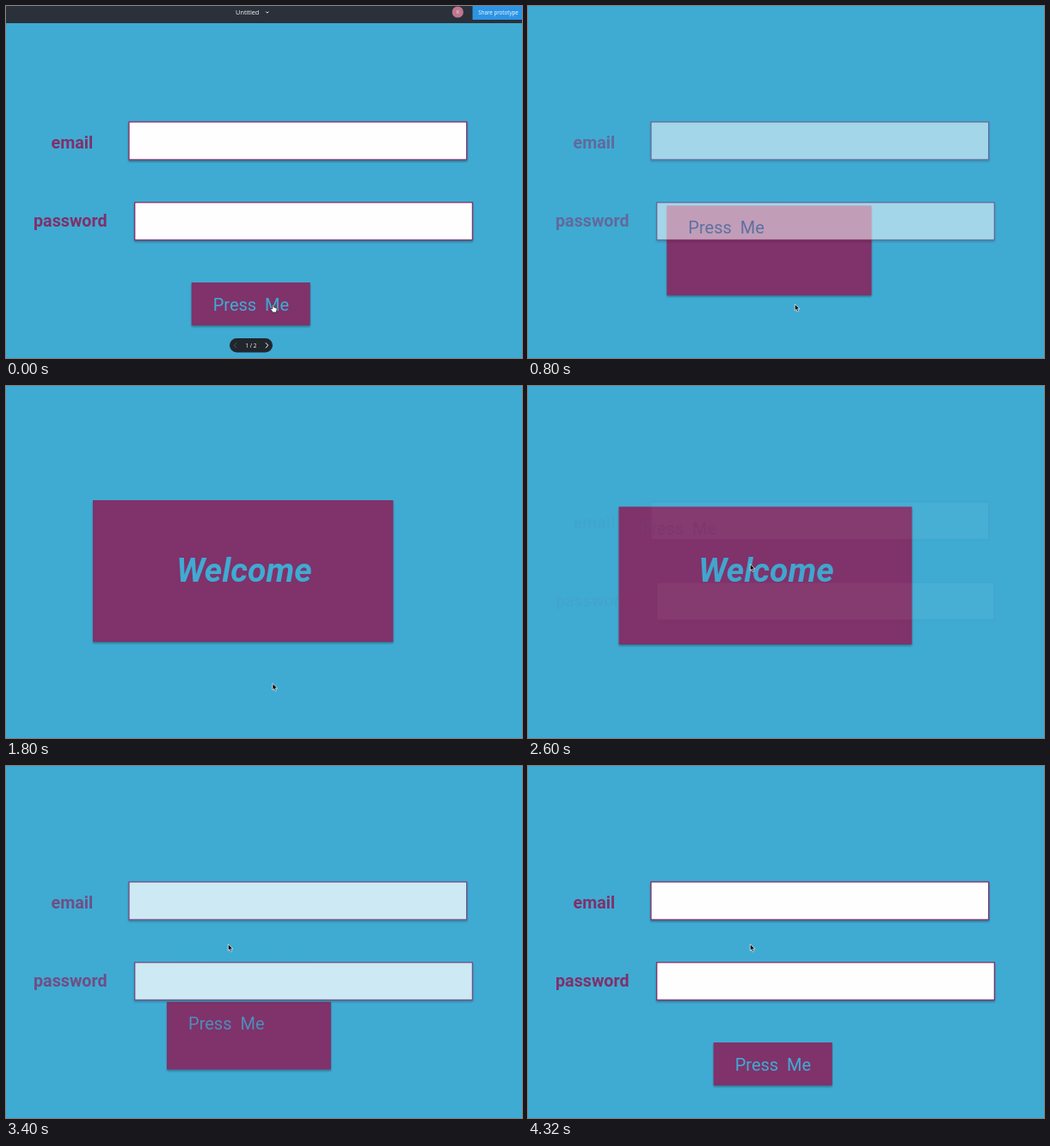
These frames come from a looping animation (600x410 px, 4360 ms). An HTML page:

```html
<!DOCTYPE html>
<html lang="en">
<head>
<meta charset="utf-8">
<title>Login prototype</title>
<style>
  html, body { margin: 0; width: 100%; height: 100%; overflow: hidden; background: #3fabd3; }
  svg { display: block; width: 600px; height: 410px; font-family: Roboto, sans-serif; }
  text { white-space: pre; }
  .plum { fill: #80306a; }
  .sky { fill: #3fabd3; }
  .label { font-size: 19.7px; font-weight: 700; }
  .ui { font-family: "Open Sans", sans-serif; fill: #fff; text-anchor: middle; }
  .line { fill: none; stroke: #fff; stroke-width: 1; }
  .field { fill: #fefefe; stroke: #80306a; stroke-width: 1.3; }
</style>
</head>
<body>
<svg viewBox="0 0 600 410">
  <defs>
    <filter id="shadow" x="-5%" y="-20%" width="110%" height="150%">
      <feDropShadow dx="0" dy="1.7" stdDeviation="1" flood-color="#000" flood-opacity=".32"/>
    </filter>
  </defs>
  <rect class="sky" width="600" height="410"/>

  <rect id="box" class="plum" filter="url(#shadow)"/>
  <g id="form">
    <text class="plum label" x="52.5" y="166">email</text>
    <text class="plum label" x="32" y="257">password</text>
    <g filter="url(#shadow)">
      <rect class="field" x="143" y="135" width="392.7" height="44"/>
      <rect class="field" x="149.7" y="228.8" width="392.7" height="43.7"/>
    </g>
    <text id="press" class="sky" font-size="20">Press  Me</text>
  </g>
  <text id="welcome" class="sky" x="277" y="227.7" font-size="39" font-weight="700"
    font-style="italic" text-anchor="middle">Welcome</text>

  <g id="chrome">
    <rect width="600" height="20" fill="#2a313a"/>
    <text class="ui" x="280.7" y="10.2" font-size="7.3">Untitled</text>
    <path class="line" stroke-width=".8" d="M302.3 6.6l1.5 1.5 1.5-1.5"/>
    <circle cx="525.3" cy="7" r="6.6" fill="#c0768f"/>
    <text class="ui" x="525.3" y="9" font-size="5.4" opacity=".8">R</text>
    <rect x="542.5" width="57.5" height="16" fill="#2c94e4"/>
    <text class="ui" x="572.6" y="9.6" font-size="6.2">Share prototype</text>
    <rect x="260" y="387" width="50" height="16.5" rx="8.2" fill="#21262d"/>
    <text class="ui" x="285" y="397.6" font-size="6.4">1 / 2</text>
    <path class="line" d="M302 392.3l2.7 3-2.7 3"/>
    <path class="line" opacity=".2" d="M268 392.3l-2.7 3 2.7 3"/>
  </g>

  <g id="cursor" stroke-linejoin="round">
    <path id="arrow" d="M0 0V7.6L1.8 6 3 8.8 4.4 8.2 3.2 5.4H5.6Z" fill="#000" stroke="#fff" stroke-width=".7"/>
    <path id="hand" d="M-.7 .7Q0-.5 .8 .7V3.4L4 4.2Q5 4.6 4.8 6L4 9.6H0L-2.6 6Q-2.6 4.6-.7 5.6Z"
      fill="#fff" stroke="#111" stroke-width=".7"/>
  </g>
</svg>
<script>
const LOOP = 4360, STEP = 40;
const OPEN = [185, 1448], CLOSE = [2329, 4014], MOVE = [1770, 2250], CHROME = [20, 540];
const SMALL = { x: 215.7, y: 322, width: 138, height: 50 };
const LARGE = { x: 101, y: 133, width: 349.3, height: 165 };

const $ = id => document.getElementById(id);
const part = Object.fromEntries(
  ["box", "form", "press", "welcome", "chrome", "cursor", "arrow", "hand"].map(id => [id, $(id)]));
const set = (name, attrs) => {
  for (const key in attrs) part[name].setAttribute(key, attrs[key]);
};
const mix = (a, b, p) => a + (b - a) * p;
const span = (t, [from, to]) => Math.min(1, Math.max(0, (t - from) / (to - from)));

// cubic-bezier(.5, 0, .5, 1), solved by bisection
function ease(x) {
  if (x <= 0 || x >= 1) return x;
  let lo = 0, hi = 1;
  for (let i = 0; i < 24; i++) {
    const s = (lo + hi) / 2;
    if (1.5 * s * (1 - s) + s ** 3 < x) lo = s; else hi = s;
  }
  return lo * lo * (3 - 2 * lo);
}

function render(t) {
  const p = ease(span(t, OPEN)) - ease(span(t, CLOSE));
  const box = {};
  for (const key in SMALL) box[key] = mix(SMALL[key], LARGE[key], p);
  set("box", box);
  set("press", { x: box.x + 25, y: box.y + 32.5 });
  set("form", { opacity: 1 - p });
  set("welcome", { opacity: p });
  set("chrome", { opacity: 1 - span(t, CHROME) });

  const m = ease(span(t, MOVE));
  const y = mix(347.3, 207.5, m);
  const pointing = t < OPEN[0] || (m > 0 && y < 298 && t < CLOSE[0]);
  set("cursor", { transform: `translate(${mix(310.3, 258.3, m)} ${y})` });
  set("hand", { visibility: pointing ? "visible" : "hidden" });
  set("arrow", { visibility: pointing ? "hidden" : "visible" });
}

const start = performance.now();
function tick() {
  const t = (performance.now() - start) % LOOP;
  render(Math.floor(t / STEP) * STEP);
  requestAnimationFrame(tick);
}
tick();
</script>
</body>
</html>
```
